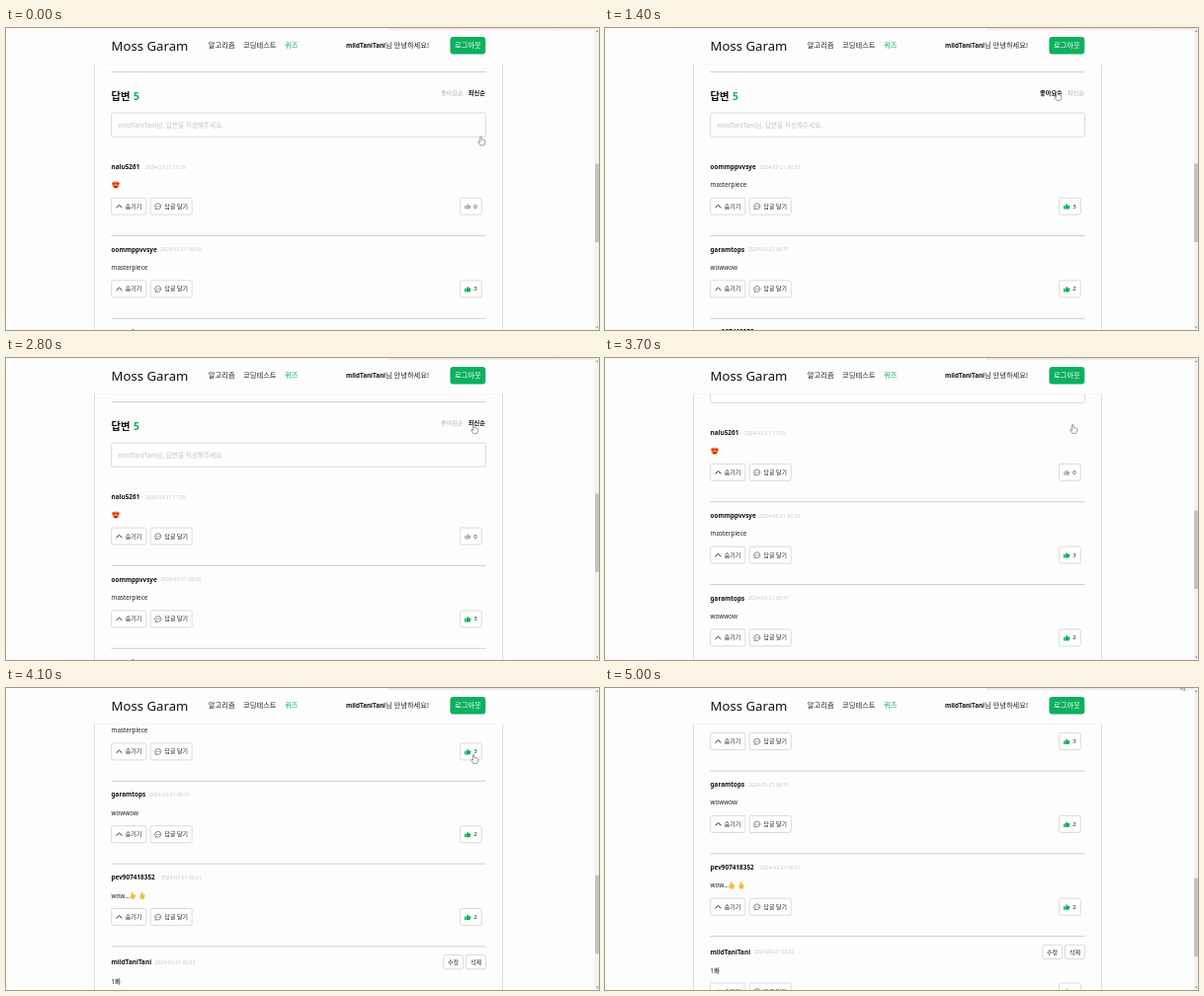
Write an HTML page that moves like this. It is 600x306 px and loops after 5.1 s.

```html
<!DOCTYPE html>
<html lang="ko">
<head>
<meta charset="utf-8">
<title>답변 정렬</title>
<style>
html, body { margin: 0; width: 100%; height: 100%; overflow: hidden; background: #fdfdfd; }
svg { display: block; width: 600px; height: 306px; font-family: "Noto Sans", "Noto Sans CJK KR", "Noto Sans CJK", sans-serif; }
text { white-space: pre; }
</style>
</head>
<body>
<svg id="stage" viewBox="0 0 600 306"></svg>
<script>
const LOOP = 5100, STEP = 100;
const GREEN = '#0cb05e', INK = '#111', LINE = '#d6d6d6';
const USER = 'mildTaniTani';
const stage = document.getElementById('stage');

const label = (x, y, size, str, fill = INK, weight = 400, extra = '') =>
  `<text x="${x}" y="${y}" font-size="${size}" fill="${fill}" font-weight="${weight}" ${extra}>${str}</text>`;
const box = (x, y, w, h, r = 1.6, fill = '#fefefe', stroke = LINE) =>
  `<rect x="${x}" y="${y}" width="${w}" height="${h}" rx="${r}" fill="${fill}" stroke="${stroke}" stroke-width=".9"/>`;
const rule = y => `<path d="M106.5 ${y}H485.5" stroke="#cbcbcb" stroke-width=".9"/>`;
const thumb = (x, y, fill) =>
  `<path transform="translate(${x} ${y})" fill="${fill}" d="M0 2.4h1.3v3.5H0zM1.7 2.4L3.1 .2q1 0 .7 1.9h2.1q.7.2.5.9l-.8 2.4q-.2.5-.7.5H1.7z"/>`;
const thumbEmoji = x =>
  `<path transform="translate(${x} 14.6)" fill="#f8b93c" d="M1.4 3.4L2.4 .3q1.3-.5 1.4.6l-.2 1.9h1.6q.9.2.7 1l-.7 2.9q-.2.6-.9.6H2L.9 6.4V3.6z"/>`;

const heart = (x, y) =>
  `<path transform="translate(${x} ${y})" fill="#e8273f" d="M0 2.3L-1.8 .3q-.3-1.6 1-1.5l.8.6.8-.6q1.3-.1 1 1.5z"/>`;
const lovedFace = `<circle cx="111" cy="18.5" r="3.7" fill="#f9b233"/>${heart(109.1, 16.9)}${heart(112.9, 16.9)}
  <path d="M108.9 19.6h4.2q-.3 2-2.1 2t-2.1-2z" fill="#8a2432"/>`;

const answers = [
  { name: 'nalu5261', date: '2024-03-21 17:29', dateX: 141, body: lovedFace, likes: 0 },
  { name: 'oommppvvsye', date: '2024-03-21 09:33', dateX: 156.3, text: 'masterpiece', likes: 3 },
  { name: 'garamtops', date: '2024-03-21 09:31', dateX: 145, text: 'wowwow', likes: 2 },
  { name: 'pev907418352', date: '2024-03-21 09:21', dateX: 157, text: 'wow...', likes: 2,
    body: thumbEmoji(125) + thumbEmoji(134.7) },
  { name: USER, date: '2024-03-21 02:02', dateX: 150.5, text: '1빠', likes: 1, mine: true }
];
const byLikes = [...answers].sort((a, b) => b.likes - a.likes);

function smallButton(x, w, str) {
  return box(x, -7.1, w, 14.2) + label(x + w / 2, 2.2, 6, str, '#222', 500, 'text-anchor="middle"');
}

function answer(a, index) {
  const shift = a.mine ? 2 : 0;
  const edit = a.mine ? smallButton(442.8, 19.6, '수정') + smallButton(465.5, 20, '삭제') : '';
  return `<g transform="translate(0 ${140.5 + index * 83.8 + shift})">
    ${label(106.5, 2.3, 6.4, a.name, INK, 700)}${label(a.dateX, 2, 5.1, a.date, '#c8c8c8')}${edit}
    <g transform="translate(0 ${shift * .7})">
      ${a.text ? label(106.5, 20.7, 6.35, a.text, '#222') : ''}${a.body || ''}
    </g>
    ${box(106.7, 31.6, 35.2, 17)}
    <path d="M111.6 41.6l2.9-2.8 2.9 2.8" fill="none" stroke="#222" stroke-width="1"/>
    ${label(120.8, 42.2, 6, '숨기기', '#222', 500)}
    ${box(146.2, 31.6, 42, 17)}
    <path d="M151.6 42.4q-2-2.4 0-4.3 2.4-1.8 4.5 0 1.9 2.3-.2 4.2-1.6 1.2-3.3.5l-1.6.4z" fill="none" stroke="#555" stroke-width=".7"/>
    <path d="M152.2 40.3h3.6" stroke="#444" stroke-width=".8" stroke-dasharray=".8 .6"/>
    ${label(160.5, 42.2, 6, '답글 달기', '#222', 500)}
    ${box(459.6, 31.6, 21.6, 17)}${thumb(464, 37.2, a.likes ? GREEN : '#b0b0b0')}
    ${label(473.3, 42.2, 6, a.likes, '#222', 500)}
    ${rule(70)}
  </g>`;
}

const tab = (x, str, active) => label(x, 68.4, 6.2, str, active ? INK : '#b4b4b4', active ? 700 : 400);

function page(liked) {
  return rule(44.5) +
    label(106.5, 72.6, 10.4, '답변', INK, 700) + label(129, 72.6, 10.4, '5', GREEN, 700) +
    tab(440, '좋아요순', liked) + tab(467.8, '최신순', !liked) +
    box(106.7, 86, 378.8, 24.2) +
    label(113.5, 100.8, 6.6, USER + '님, 답변을 작성해주세요.', '#c2c2c2') +
    (liked ? byLikes : answers).map(answer).join('');
}

stage.innerHTML = `
  <defs><linearGradient id="shade" x2="0" y2="1">
    <stop offset="0" stop-color="#e4e4e4"/><stop offset="1" stop-color="#fdfdfd"/>
  </linearGradient></defs>
  <rect width="600" height="306" fill="#fdfdfd"/>
  <rect x="89.5" y="30" width="413" height="290" fill="#fdfdfd" stroke="#dadada" stroke-width=".9"/>
  <g id="byNew">${page(false)}</g><g id="byLike">${page(true)}</g>
  <rect width="596" height="36.5" fill="#fdfdfd"/>
  <path d="M90 36.5H502" stroke="#f5f5f5" stroke-width=".8"/>
  <rect x="386" width="210" height="3" fill="url(#shade)"/>
  ${label(106.5, 23.3, 13.2, 'Moss Garam', INK, 500)}
  ${label(204.8, 20.4, 7.3, '알고리즘', '#222')}
  ${label(240, 20.4, 7.3, '코딩테스트', '#222')}
  ${label(282, 20.4, 7.3, '퀴즈', GREEN)}
  ${label(344, 19.8, 6.3, USER, INK, 700)}
  ${label(384, 19.9, 7.25, '님 안녕하세요!', '#222')}
  <rect x="449.4" y="9.1" width="35.8" height="17.3" rx="3" fill="${GREEN}"/>
  ${label(467.4, 20.4, 7.3, '로그아웃', '#fff', 400, 'text-anchor="middle"')}
  <rect x="596" width="4" height="306" fill="#f1f1f1"/>
  <path d="M597 4l1.2-1.8 1.2 1.8zM597 302.6l1.2 1.8 1.2-1.8z" fill="#888"/>
  <rect id="thumb" x="596" width="4" height="79.5" fill="#c4c4c4"/>
  <path id="hand" d="M-1.8-4.4q.9-.9 1.5 .2v2.6l2.8.7q1.2.3 1 1.4l-.5 2.2-.7 1.7h-3.8L-3.7 1q.4-1.1 1.4-.3l.5.6z" fill="#fff" stroke="#808080" stroke-width=".8" stroke-linejoin="round"/>
  <path id="arrow" d="M0 0v7.6l1.8-1.6 1.2 2.7 1.4-.6-1.2-2.6h2.3z" fill="#fff" stroke="#777" stroke-width=".7" stroke-linejoin="round"/>`;

const part = Object.fromEntries(['byNew', 'byLike', 'thumb', 'hand', 'arrow'].map(id => [id, document.getElementById(id)]));

// Keys are [time, ...values]; each value holds until the next key.
const scrollKeys = [[0, 0], [3700, 64.8], [3800, 84], [4000, 126.1], [4100, 200], [4200, 210.3]];
const handKeys = [[0, 481.5, 114.5], [1100, 458.5, 69], [2000, 449, 110], [2100, 462, 178], [2200, 474.3, 72]];
const arrowKeys = [[4200, 552, .3], [4300, 576, -4], [4400, 583, -14], [4700, 583, -6], [4800, 583, -6.5], [5000, 582.6, -6]];
const held = (keys, t) => keys.reduce((last, key) => key[0] <= t ? key : last).slice(1);
const show = (el, on) => el.setAttribute('visibility', on ? 'visible' : 'hidden');
const move = (el, x, y) => el.setAttribute('transform', `translate(${x} ${y})`);

function handAt(t) {
  if (t < 600 || t >= 1100) return held(handKeys, t);
  const p = (t - 500) / 600, k = p * p * (3 - 2 * p);
  return [481.5 - 23 * k, 114.5 - 45.5 * k];
}

function draw(time) {
  const t = Math.floor(time % LOOP / STEP) * STEP;
  const liked = t >= 1300 && t < 2800;
  const [scroll] = held(scrollKeys, t);
  show(part.byLike, liked);
  show(part.byNew, !liked);
  move(part.byNew, 0, -scroll);
  part.thumb.setAttribute('y', 137.5 + scroll * .262);
  show(part.hand, t < 4200);
  show(part.arrow, t >= 4200);
  move(part.hand, ...handAt(t));
  move(part.arrow, ...held(arrowKeys, t));
}

const start = performance.now();
function tick() {
  draw(performance.now() - start);
  requestAnimationFrame(tick);
}
tick();
</script>
</body>
</html>
```
